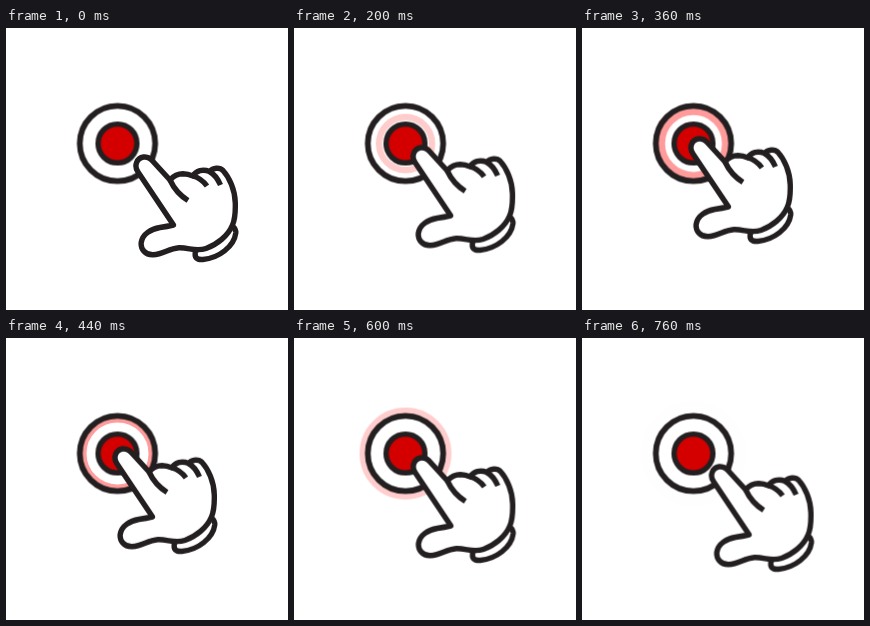
Write an HTML page without scripts that moves like this. It is 282 by 282 pixels and loops after 0.8 s.

```html
<!DOCTYPE html>
<html lang="en">
<head>
<meta charset="utf-8">
<title>Press the button</title>
<style>
  html, body { margin: 0; width: 100%; height: 100%; overflow: hidden; background: #fff; }
  svg { display: block; width: 100vw; height: 100vh; }

  .ink { fill: #fff; stroke: #231f20; stroke-width: 5.4; stroke-linecap: round; stroke-linejoin: round; }
  .rim { fill: none; stroke-width: 5.8; }
  .knob { fill: #d40000; }
  .crease { fill: none; stroke-linecap: butt; }

  .pulse {
    fill: none; stroke: #f00; stroke-width: 11.6;
    animation: grow .8s linear infinite, glow .4s ease-in-out infinite alternate;
  }
  .hand { animation: press .4s ease-in-out infinite alternate; }

  @keyframes grow { from { transform: scale(.4); } to { transform: scale(1); } }
  @keyframes glow { from { opacity: 0; } to { opacity: .4; } }
  @keyframes press { to { transform: translate(-21.5px, -18.6px); } }
</style>
</head>
<body>
<svg viewBox="0 0 282 282">
  <g transform="translate(111.5 115.5)">
    <circle class="pulse" r="48.2"/>
    <circle class="ink rim" r="37.7"/>
    <circle class="ink knob" r="19.4"/>
  </g>
  <g class="hand">
    <!-- cuff -->
    <path class="ink" d="M189.500 223C188 229.500 190.500 232 197 231.500C213 230 228 218.500 229.800 205Q230 201 227 198.500Z"/>
    <!-- glove -->
    <path class="ink" d="M167.500 197L132 144C127.500 137.500 131 130 137.500 129C142 128.500 145 130.500 147.500 134L164 152
      C168 147.500 172 145.800 177 145.800Q182 146 187 148C190 142.500 197 140.800 203.500 143.500C207 139.800 213.500 139 217 142.500
      C223 149 229.500 162 229.300 176C229.500 186 229 191 226.500 197C222 208 211 216.500 200 220.500C190 224 183 219.500 173 219.800
      C162 220.500 158 226.500 147 226.800C139 227 134.500 221 135.200 214.500C136.500 206 145 201 154 199.500Q161 198.500 167.500 197Z"/>
    <path class="ink crease" d="M164 152Q170 165 182 172.500M187 148Q195 150 201 158M203.500 143.500Q210 147 214.500 157"/>
  </g>
</svg>
</body>
</html>
```
